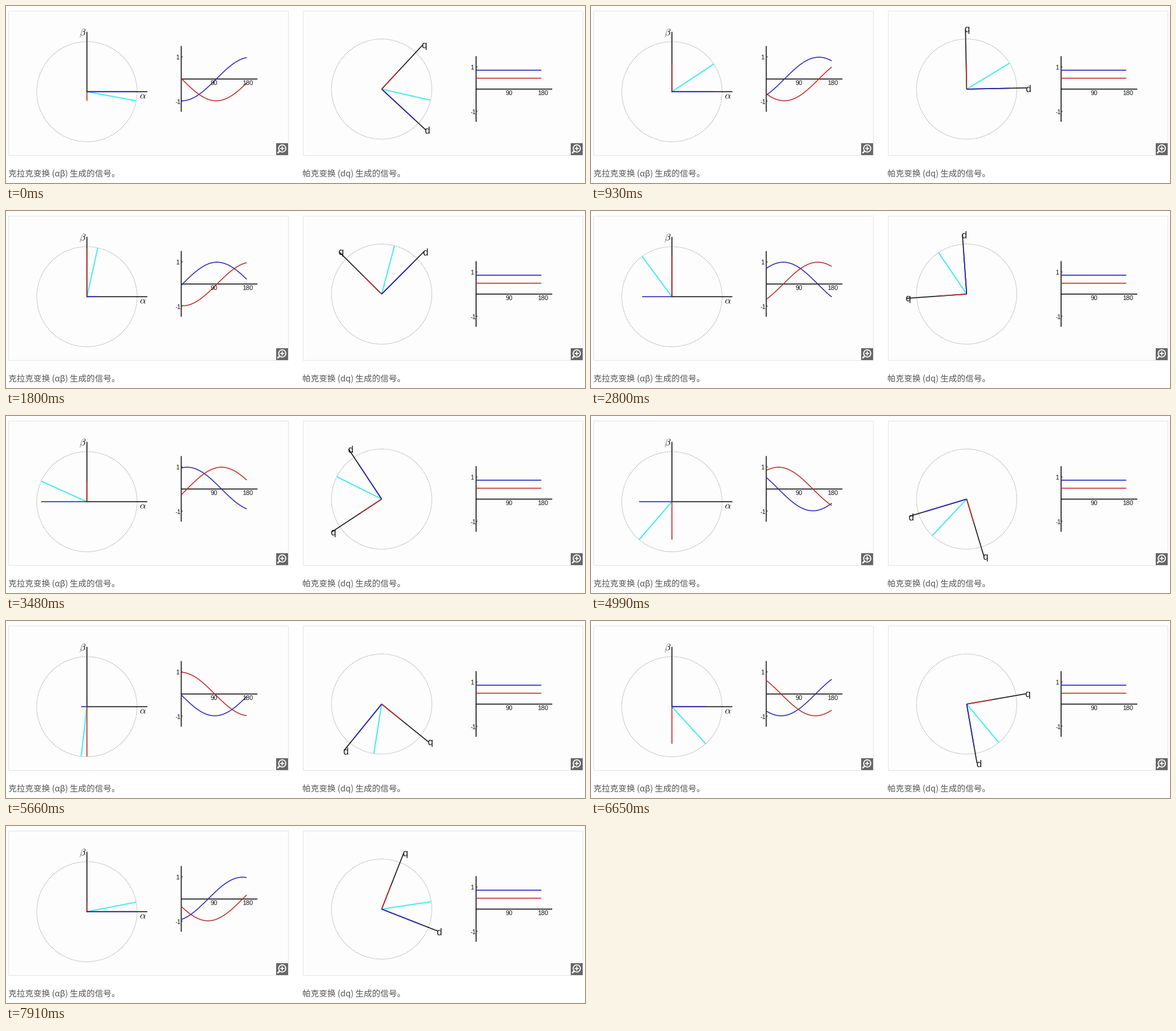
Recreate the animation shown at these times as a matplotlib script. Size 973 px wide and 298 px high, loop 8 s.

```python
import numpy as np
import matplotlib.pyplot as plt
from matplotlib.animation import FuncAnimation
from matplotlib.patches import Circle, Rectangle

W, H, DPI = 973, 298, 64
LOOP, INTERVAL = 8000, 40
RADIUS, AXIS = 84.3, 101
STEP = 4.89           # degrees per pose
SPAN = 171            # degrees shown by the signal curves
AMPLITUDE = 36.7
BLUE, RED, CYAN, BLACK = "#2626bc", "#bc2a2a", "#48ecec", "#161616"
CLARKE, PARK = (135.5, 143.8), (630.8, 139.4)


def pt(pixels):
    return pixels * 72 / DPI


fig = plt.figure(figsize=(W / DPI, H / DPI), dpi=DPI, facecolor="white")
ax = fig.add_axes([0, 0, 1, 1])
ax.set_xlim(-0.5, W - 0.5)
ax.set_ylim(H - 0.5, -0.5)
ax.axis("off")


def line(x=(), y=(), color=BLACK, width=1.6, z=3):
    return ax.plot(x, y, color=color, lw=pt(width), zorder=z, snap=False,
                   solid_capstyle="butt")[0]


def label(x, y, text, size, font="Liberation Sans", color=BLACK, ha="left"):
    return ax.text(x, y, text, fontsize=pt(size), family=font, color=color,
                   ha=ha, va="baseline", zorder=6)


def panel(x):
    ax.add_patch(Rectangle((x, 8), 470, 243, fc="#fdfdfd", ec="#e4e4e4",
                           lw=pt(1), zorder=0, snap=False))
    ax.add_patch(Rectangle((x + 449.5, 230.5), 20, 20, fc="#666666", lw=0,
                           zorder=4))
    cx, cy = x + 459.7, 239.3
    ax.add_patch(Circle((cx, cy), 6, fill=False, ec="white", lw=pt(1.7),
                        zorder=5))
    line((cx - 3.5, cx + 3.5), (cy, cy), "white", 1.7, 5)
    line((cx, cx), (cy - 3.5, cy + 3.5), "white", 1.7, 5)
    line((cx - 4, cx - 8), (cy + 4, cy + 8), "white", 2.4, 5)


def dotted_circle(center):
    ax.add_patch(Circle(center, RADIUS, fill=False, ec="#555555",
                        lw=pt(0.9), ls=(0, (1, 2.1)), zorder=1))


def plot_axes(x, y):
    line((x, x), (y - 55.5, y + 55))
    line((x - 0.5, x + 128), (y, y))
    for value in (1, -1):
        ty = y - value * 37.2
        line((x, x + 2.5), (ty, ty), width=1)
        label(x - 3.5 if value > 0 else x - 0.5, ty + 4.6, str(value), 10.5,
              ha="right")
    label(x + 55, y + 9.8, "90", 10.8, ha="center")
    label(x + 111.7, y + 9.8, "180", 10.8, ha="center")


def set_ray(ray, center, angle, length):
    a = np.radians(angle)
    ray.set_data([center[0], center[0] + length * np.cos(a)],
                 [center[1], center[1] - length * np.sin(a)])


panel(4)
panel(499)
label(3, 286, "克拉克变换 (αβ) 生成的信号。", 14, "Noto Sans CJK JP", "#555555")
label(498, 286, "帕克变换 (dq) 生成的信号。", 14, "Noto Sans CJK JP", "#555555")

plt.rcParams["mathtext.fontset"] = "cm"
dotted_circle(CLARKE)
line((135.5, 135.5), (43, 144.6))
line((134.7, 237), (143.8, 143.8))
label(128, 48.5, r"$\beta$", 16.5, ha="center")
label(229.5, 155.5, r"$\alpha$", 16.5, ha="center")
plot_axes(294, 122.4)

dotted_circle(PARK)
plot_axes(789.5, 139.4)
line((789.5, 899), (107.6, 107.6), "#2424d0")
line((789.5, 899), (121.1, 121.1), "#cc2828")

clarke_vector = line(color=CYAN, width=2, z=2)
alpha_part = line(color=BLUE, z=4)
beta_part = line(color=RED, z=4)
alpha_curve = line(color=BLUE, width=1.5, z=4)
beta_curve = line(color=RED, width=1.5, z=4)

park_vector = line(color=CYAN, width=2, z=2)
d_axis, q_axis = line(), line()
d_part, q_part = line(color=BLUE, z=4), line(color=RED, z=4)
d_label, q_label = label(0, 0, "d", 16), label(0, 0, "q", 16)

curve_x = np.linspace(294, 404, 90)


def pose(frame):
    # poses advance at about 10 per second, shown on a 15 per second clock
    slot = int((frame * INTERVAL + 30) * 15 / 1000)
    return int(slot * 0.66 + 0.45)


def draw(frame):
    turn = STEP * pose(frame)

    theta = turn - 10.45
    a = np.radians(theta)
    set_ray(clarke_vector, CLARKE, theta, RADIUS)
    set_ray(alpha_part, CLARKE, 0, RADIUS * np.cos(a))
    set_ray(beta_part, CLARKE, 90, RADIUS * np.sin(a))
    phase = np.radians(np.linspace(theta - SPAN, theta, curve_x.size))
    alpha_curve.set_data(curve_x, 122.4 - AMPLITUDE * np.cos(phase))
    beta_curve.set_data(curve_x, 122.4 - AMPLITUDE * np.sin(phase))

    d = turn - 42.85
    set_ray(park_vector, PARK, d + 30, RADIUS)
    for angle, axis, part, share, text, drop in (
            (d, d_axis, d_part, np.cos(np.pi / 6), d_label, 6.7),
            (d + 90, q_axis, q_part, 0.5, q_label, 5.2)):
        set_ray(axis, PARK, angle, AXIS)
        set_ray(part, PARK, angle, RADIUS * share)
        tip_x, tip_y = axis.get_xdata()[1], axis.get_ydata()[1]
        text.set_position((tip_x - 1.7, tip_y + drop))
    return []


anim = FuncAnimation(fig, draw, frames=LOOP // INTERVAL, interval=INTERVAL,
                     repeat=True, repeat_delay=0, blit=False)
plt.show()
```
